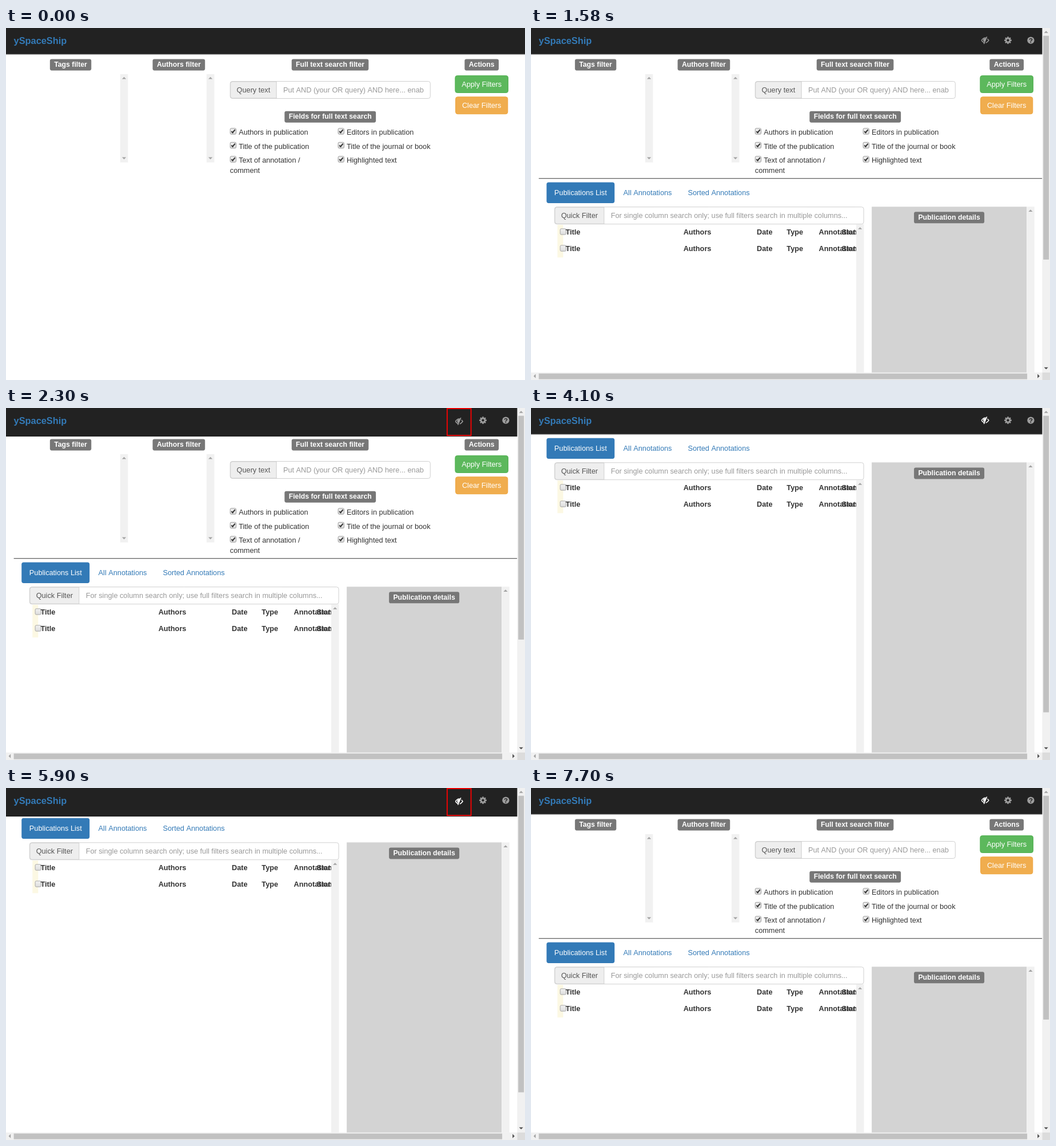
These frames come from a looping animation (908 by 617 pixels, 8000 ms). An HTML page with a canvas:

```html
<!DOCTYPE html>
<html lang="en">
<head>
<meta charset="utf-8">
<title>Filter panel toggle</title>
<style>
  html, body { margin: 0; width: 100%; height: 100%; overflow: hidden; background: #fff; }
  canvas { display: block; }
</style>
</head>
<body>
<canvas id="stage" width="908" height="617"></canvas>
<script>
const ctx = document.getElementById('stage').getContext('2d');
const SCALE = 0.908;          // the page is laid out 1000 px wide
const LOOP = 8000;
const FAMILY = '"Liberation Sans", Arial, sans-serif';
const BLUE = '#337ab7', MUTED = '#9d9d9d', NAV = '#222';

const STATES = [
  { until: 500, filters: true, list: false },
  { until: 2300, filters: true, list: true },
  { until: 4100, filters: true, list: true, marked: true },
  { until: 5900, filters: false, list: true, active: true },
  { until: 7700, filters: false, list: true, active: true, marked: true },
  { until: LOOP, filters: true, list: true, active: true }
];

function rect(x, y, w, h, color) {
  ctx.fillStyle = color;
  ctx.fillRect(x, y, w, h);
}

function box(x, y, w, h, radius, fill, border) {
  const inset = border ? 0.5 : 0;
  ctx.beginPath();
  ctx.roundRect(x + inset, y + inset, w - 2 * inset, h - 2 * inset, radius);
  ctx.fillStyle = fill;
  ctx.fill();
  if (border) {
    ctx.strokeStyle = border;
    ctx.lineWidth = 1;
    ctx.stroke();
  }
}

function setFont(size, bold) {
  ctx.font = `${bold ? 'bold ' : ''}${size}px ${FAMILY}`;
}

function text(str, x, y, color = '#333', bold = false, size = 14, align = 'left') {
  setFont(size, bold);
  ctx.textAlign = align;
  ctx.fillStyle = color;
  ctx.fillText(str, x, y);
}

function clipped(x, y, w, h, draw) {
  ctx.save();
  ctx.beginPath();
  ctx.rect(x, y, w, h);
  ctx.clip();
  draw();
  ctx.restore();
}

function label(str, cx, top) {
  setFont(13.5, true);
  const w = ctx.measureText(str).width + 16.2;
  box(cx - w / 2, top, w, 22, 3.4, '#777');
  text(str, cx, top + 15, '#fff', true, 13.5, 'center');
}

function button(str, cx, top, fill, border) {
  setFont(14);
  const w = ctx.measureText(str).width + 26;
  box(cx - w / 2, top, w, 34, 4, fill, border);
  text(str, cx, top + 22, '#fff', false, 14, 'center');
}

function inputGroup(x, y, w, caption, hint) {
  setFont(14);
  const split = ctx.measureText(caption).width + 25;
  box(x, y, w, 34, 4, '#fff', '#ccc');
  box(x + 0.5, y + 0.5, split, 33, [4, 0, 0, 4], '#eee', '#ccc');
  text(caption, x + 13, y + 22, '#555');
  clipped(x + split, y, w - split - 13, 34, () => text(hint, x + split + 13, y + 22, '#999'));
}

function checkbox(x, y, checked) {
  const shade = ctx.createLinearGradient(0, y, 0, y + 12);
  shade.addColorStop(0, '#f2f2f2');
  shade.addColorStop(1, '#dcdcdc');
  box(x, y, 12.3, 12.3, 2, shade, checked ? '#8f8f8f' : '#a0a0a0');
  if (!checked) return;
  ctx.beginPath();
  ctx.moveTo(x + 2.8, y + 6.2);
  ctx.lineTo(x + 5.2, y + 8.8);
  ctx.lineTo(x + 9.8, y + 2.9);
  ctx.strokeStyle = '#333';
  ctx.lineWidth = 2.2;
  ctx.stroke();
}

// Triangle pointing up, turned by quarter steps clockwise.
function arrow(x, y, turns, color = '#a3a3a3') {
  ctx.save();
  ctx.translate(x, y);
  ctx.rotate(turns * Math.PI / 2);
  ctx.beginPath();
  ctx.moveTo(-4, 2);
  ctx.lineTo(0, -2);
  ctx.lineTo(4, 2);
  ctx.fillStyle = color;
  ctx.fill();
  ctx.restore();
}

function track(x, y, h, hasEnd) {
  rect(x, y, 15, h, '#f1f1f1');
  arrow(x + 7.5, y + 7.5, 0);
  if (hasEnd) arrow(x + 7.5, y + h - 8, 2);
}

function icon(x, y, draw) {
  ctx.save();
  ctx.translate(x, y);
  draw();
  ctx.restore();
}

function line(x1, y1, x2, y2, width, color) {
  ctx.beginPath();
  ctx.moveTo(x1, y1);
  ctx.lineTo(x2, y2);
  ctx.lineWidth = width;
  ctx.strokeStyle = color;
  ctx.stroke();
}

function disc(r, color, x = 0, y = 0) {
  ctx.beginPath();
  ctx.arc(x, y, r, 0, 2 * Math.PI);
  ctx.fillStyle = color;
  ctx.fill();
}

function eye(color) {
  ctx.beginPath();
  ctx.moveTo(-7, 0);
  ctx.quadraticCurveTo(0, -9.6, 7, 0);
  ctx.quadraticCurveTo(0, 9.6, -7, 0);
  ctx.strokeStyle = color;
  ctx.lineWidth = 1.7;
  ctx.stroke();
  disc(3.2, color, -0.6, -0.6);
  line(5, -7, -0.8, 7, 2, NAV);
  line(3.4, -7, -2.4, 7, 1.7, color);
}

function gear() {
  for (let i = 0; i < 4; i++) {
    const a = i * Math.PI / 4, c = 7 * Math.cos(a), s = 7 * Math.sin(a);
    line(-c, -s, c, s, 3, MUTED);
  }
  disc(5.2, MUTED);
  disc(2.3, NAV);
}

function help() {
  disc(6.8, MUTED);
  text('?', 0, 4.4, NAV, true, 12.5, 'center');
}

function navbar(state) {
  const height = state.marked ? 54 : 50;
  rect(0, 0, 1000, height, NAV);
  rect(0, height, 1000, 1, '#080808');
  text('ySpaceShip', 15, 31, BLUE, true, 18);
  if (!state.list) return;
  const shift = state.marked ? 2 : 0;
  icon(875 - shift, 23.8 + shift, () => eye(state.active ? '#fff' : MUTED));
  icon(919, 23.8, gear);
  icon(963, 23.8, help);
  if (state.marked) {
    ctx.strokeStyle = '#f00';
    ctx.lineWidth = 2;
    ctx.strokeRect(850, 1, 46, 52);
  }
}

function filters() {
  label('Tags filter', 124.5, 60);
  label('Authors filter', 333, 60);
  label('Full text search filter', 624.5, 60);
  label('Actions', 916.5, 60);
  track(220, 89, 170.5, true);
  track(386.4, 89, 170.5, true);

  inputGroup(431.5, 102.5, 386.5, 'Query text', 'Put AND (your OR query) AND here... enab');
  label('Fields for full text search', 624.7, 160.5);
  [
    ['Authors in publication', 'Editors in publication'],
    ['Title of the publication', 'Title of the journal or book'],
    ['Text of annotation /', 'Highlighted text']
  ].forEach((row, r) => row.forEach((name, c) => {
    const x = 431.5 + 208 * c, y = 206 + 27 * r;
    checkbox(x, y - 12.8, true);
    text(name, x + 16.9, y);
  }));
  text('comment', 431.5, 280);

  button('Apply Filters', 916.5, 91.5, '#5cb85c', '#4cae4c');
  button('Clear Filters', 916.5, 132.5, '#f0ad4e', '#eea236');
}

function headerRow(y) {
  checkbox(55.8, y - 12, false);
  [['Title', 66.5], ['Authors', 293.7], ['Date', 435], ['Type', 492.7],
   ['Annotation', 554.5], ['Status', 598.7]]
    .forEach(([name, x]) => text(name, x, y, '#333', true));
}

function listing(top) {
  box(30, top, 131, 40, 4, BLUE);
  text('Publications List', 45, top + 25, '#fff');
  text('All Annotations', 178, top + 25, BLUE);
  text('Sorted Annotations', 302.3, top + 25, BLUE);

  const y = top + 47;
  inputGroup(45, y, 596.5, 'Quick Filter',
    'For single column search only; use full filters search in multiple columns...');
  rect(51, y + 35, 11, 63, '#fcf8e3');
  clipped(45, y + 34, 581.5, 300, () => {
    headerRow(y + 54);
    headerRow(y + 86);
  });
  track(626.5, y + 34, 640);

  rect(656.5, y, 298.5, 640, '#d3d3d3');
  label('Publication details', 805.7, y + 10);
  track(955, y, 640);
}

function pageScrollbars(thumbEnd) {
  const dark = '#505050', thumb = '#c1c1c1';
  track(985, 0, 665);
  rect(987, 15, 11, thumbEnd - 15, thumb);
  arrow(992.5, 657, 2, dark);
  rect(0, 665, 985, 15, '#f1f1f1');
  rect(15, 667, 941, 11, thumb);
  arrow(7, 672, 3);
  arrow(978, 672, 1, dark);
  rect(985, 665, 15, 15, '#dcdcdc');
}

function render(time) {
  const state = STATES.find(s => time < s.until);
  ctx.setTransform(SCALE, 0, 0, SCALE, 0, 0);
  rect(0, 0, 1000, 680, '#fff');
  if (state.filters) filters();
  if (state.list) {
    if (state.filters) rect(15, 290, 970, 1, '#222');
    listing(state.filters ? 298 : 58);
  }
  navbar(state);
  if (state.list) pageScrollbars(state.filters ? 447 : 587.5);
}

const start = performance.now();
function tick() {
  render((performance.now() - start) % LOOP);
  requestAnimationFrame(tick);
}
tick();
</script>
</body>
</html>
```
